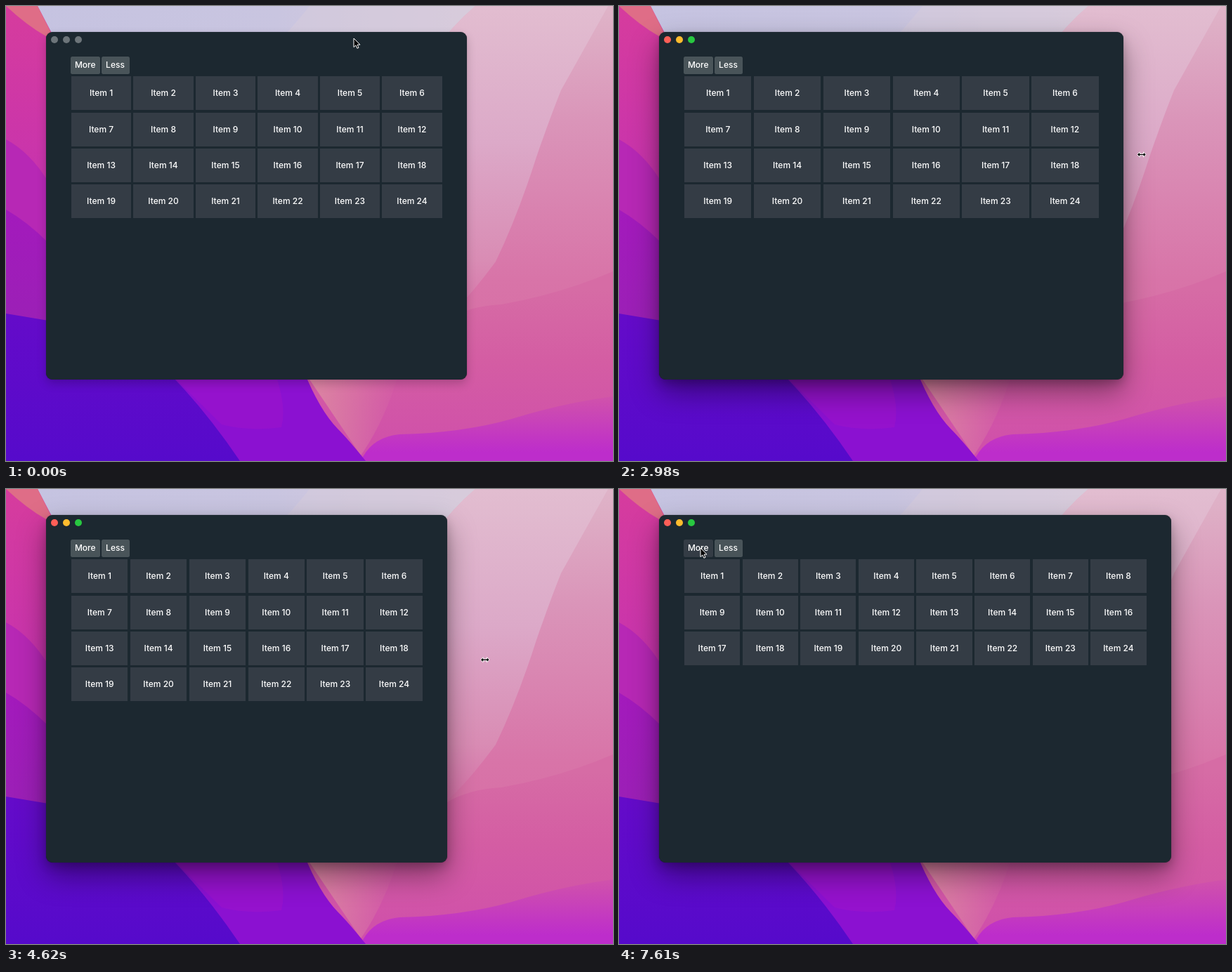
Recreate the animation shown at these times as an HTML page. Size 864x648 px, loop 8000 ms.

```html
<!DOCTYPE html>
<html lang="en">
<head>
<meta charset="utf-8">
<title>Resizable grid</title>
<style>
  html, body { margin: 0; width: 100%; height: 100%; overflow: hidden; }
  #stage {
    position: relative; width: 864px; height: 648px; overflow: hidden;
    font: 500 12px/1 Inter, sans-serif; color: #fff;
    background: linear-gradient(#d6b4cf00 5%, #d2a0c4 45%), linear-gradient(90deg, #c5c3e1, #c9c5e0 45%, #dbcbdb 75%);
  }
  #stage > b, #stage > svg { position: absolute; inset: 0; }
  #win {
    position: absolute; z-index: 0; left: 57px; top: 36.5px; height: 495px;
    border-radius: 9px; background: #1c2830;
    box-shadow: 0 0 1px #0009, 0 6px 14px #0003;
  }
  #glow { position: absolute; inset: 0; z-index: -1; border-radius: 9px; box-shadow: 0 18px 42px #0006; }
  #dots { position: absolute; left: 6.8px; top: 6.3px; display: flex; gap: 6.6px; }
  #dots i { width: 10.4px; height: 10.4px; border-radius: 50%; background: #6d757a; }
  .on #dots i { background: var(--c); }
  .btn {
    position: absolute; top: 35.5px; height: 25px; line-height: 24.5px;
    text-align: center; border-radius: 2.5px; background: #495459;
  }
  #more { left: 34.5px; width: 42.5px; }
  #less { left: 78.5px; width: 40px; }
  #grid { position: absolute; left: 36px; right: 35.5px; top: 63.7px; display: grid; gap: 3.4px; }
  #grid div { height: 48px; line-height: 48.5px; text-align: center; white-space: nowrap; min-width: 0; }
  #grid div, .btn.hover { background: #343c45; }
</style>
</head>
<body>
<div id="stage">
  <!-- Wallpaper, back to front -->
  <b style="clip-path:path('M432 0Q420 16 398 40H640L668 0Z');background:#d5cbdc99"></b>
  <b style="clip-path:path('M668 0Q600 58 568 145Q548 200 540 290V648H864V0Z');background:linear-gradient(#dfb4c8,#da95b9 25%,#d874a8 60%,#d665a2)"></b>
  <b style="clip-path:path('M668 0Q600 58 568 145Q540 220 548 340Q560 460 592 466Q630 455 697 364Q728 300 755 215Q774 160 790 120L857 0Z');background:linear-gradient(#e2bdd0,#dca9c8 30%,#d98cb4 56%,#d66ca6 72%)"></b>
  <b style="clip-path:path('M424 520L560 468Q595 468 625 448Q655 428 705 425Q790 410 864 378V648H424Z');background:linear-gradient(#d66ca5 62%,#d45da3 78%,#cf4eab)"></b>
  <b style="clip-path:path('M424 520H560Q540 590 505 640Z');background:linear-gradient(90deg,#dc86a2 50%,#dc86a200 65%)"></b>
  <b style="clip-path:path('M505 648Q520 614 560 610Q650 608 720 588Q790 566 864 556V648Z');background:linear-gradient(#d052ab 86%,#bd2dcb 98%)"></b>
  <b style="clip-path:path('M220 520H424Q446 575 472 602Q488 618 512 648H220Z');background:#8b11d1"></b>
  <b style="clip-path:path('M230 520H382Q400 570 392 600Q345 606 307 596Z');background:#9a13cdb0"></b>
  <b style="clip-path:path('M0 0H45L70 48V300H0Z');background:linear-gradient(#d63c9d,#c733ae 40%)"></b>
  <b style="clip-path:path('M0 0H45L66 42L57 43Q30 28 0 0Z');background:#df6d87"></b>
  <b style="clip-path:path('M0 190Q34 208 60 250V350H0Z');background:#b728b5"></b>
  <b style="clip-path:path('M0 290Q30 307 60 337V460H0Z');background:linear-gradient(#a31abc 45%,#9b20b6 70%)"></b>
  <b style="clip-path:path('M0 438L60 448V520H229Q283 574 333 648H0Z');background:linear-gradient(#640bc9 68%,#560acb)"></b>

  <div id="win">
    <div id="glow"></div>
    <div id="dots"><i style="--c:#ff5f57"></i><i style="--c:#febc2e"></i><i style="--c:#28c840"></i></div>
    <div class="btn" id="more">More</div>
    <div class="btn" id="less">Less</div>
    <div id="grid"></div>
  </div>

  <svg width="864" height="648">
    <g id="cursor" stroke="#fff" stroke-linejoin="round">
      <path id="arrow" d="M0 0V12.6L2.9 9.9L4.9 14.3L7 13.4L5.1 9.1H9Z"/>
      <path id="resize" d="M-6.3 0L-2.6 -3.6V-1.2H2.6V-3.6L6.3 0L2.6 3.6V1.2H-2.6V3.6Z"/>
    </g>
  </svg>
</div>
<script>
  const $ = id => document.getElementById(id);
  const LOOP = 8000, START = 590, STEP = 149; // ms; the screen refreshes once per step
  const GRAB = 9, DRAG = 12, DROP = 34;       // steps

  // Turning points of the pointer: step, x, y.
  const turns = [
    [2, 495, 46], [5, 650, 195], [8, 650, 195], [GRAB, 661, 199], [DRAG, 661, 199],
    [19, 806, 221], [20, 777, 224], [23, 548, 240], [24, 536, 242], [29, 779, 244],
    [30, 778, 244], [31, 798, 245], [33, 791, 247], [35, 776, 238],
    [39, 160, 84], [40, 130, 79], [42, 116, 84]
  ];

  const clamp = (v, lo, hi) => Math.min(Math.max(v, lo), hi);

  function pointer(step) {
    const s = clamp(step, turns[0][0], turns[turns.length - 1][0]);
    const i = Math.max(1, turns.findIndex(p => p[0] >= s));
    const [a, xa, ya] = turns[i - 1], [b, xb, yb] = turns[i];
    const k = (s - a) / (b - a);
    return [xa + (xb - xa) * k, ya + (yb - ya) * k];
  }

  for (let i = 1; i <= 24; i++) {
    const cell = document.createElement('div');
    cell.textContent = 'Item ' + i;
    $('grid').append(cell);
  }

  function draw(step) {
    const [x, y] = pointer(step);
    // The window reacts to the pointer one refresh late.
    const [edge] = pointer(clamp(step - 1, DRAG, DROP - 1));
    const [hx, hy] = pointer(step - 1);
    const over = (from, to) => hy > 72 && hy < 97 && hx > from && hx < to;
    const sizing = step >= GRAB && step <= DROP;
    const cols = 6 + (step >= 43) + (step >= 46);

    $('win').style.width = edge - 62 + 'px';
    $('win').classList.toggle('on', step >= 0);
    $('glow').style.opacity = clamp((step + 1) / 2, 0, 1);
    $('grid').style.gridTemplateColumns = `repeat(${cols}, 1fr)`;
    $('more').classList.toggle('hover', over(91, 134));
    $('less').classList.toggle('hover', over(135, 176));
    $('cursor').setAttribute('transform', `translate(${x} ${y})`);
    $('arrow').style.display = sizing ? 'none' : '';
    $('resize').style.display = sizing ? '' : 'none';
  }

  const t0 = performance.now();
  let shown;
  function frame() {
    const t = (performance.now() - t0) % LOOP;
    const step = Math.floor((t - START) / STEP);
    if (step !== shown) draw(shown = step);
    requestAnimationFrame(frame);
  }
  frame();
</script>
</body>
</html>
```
